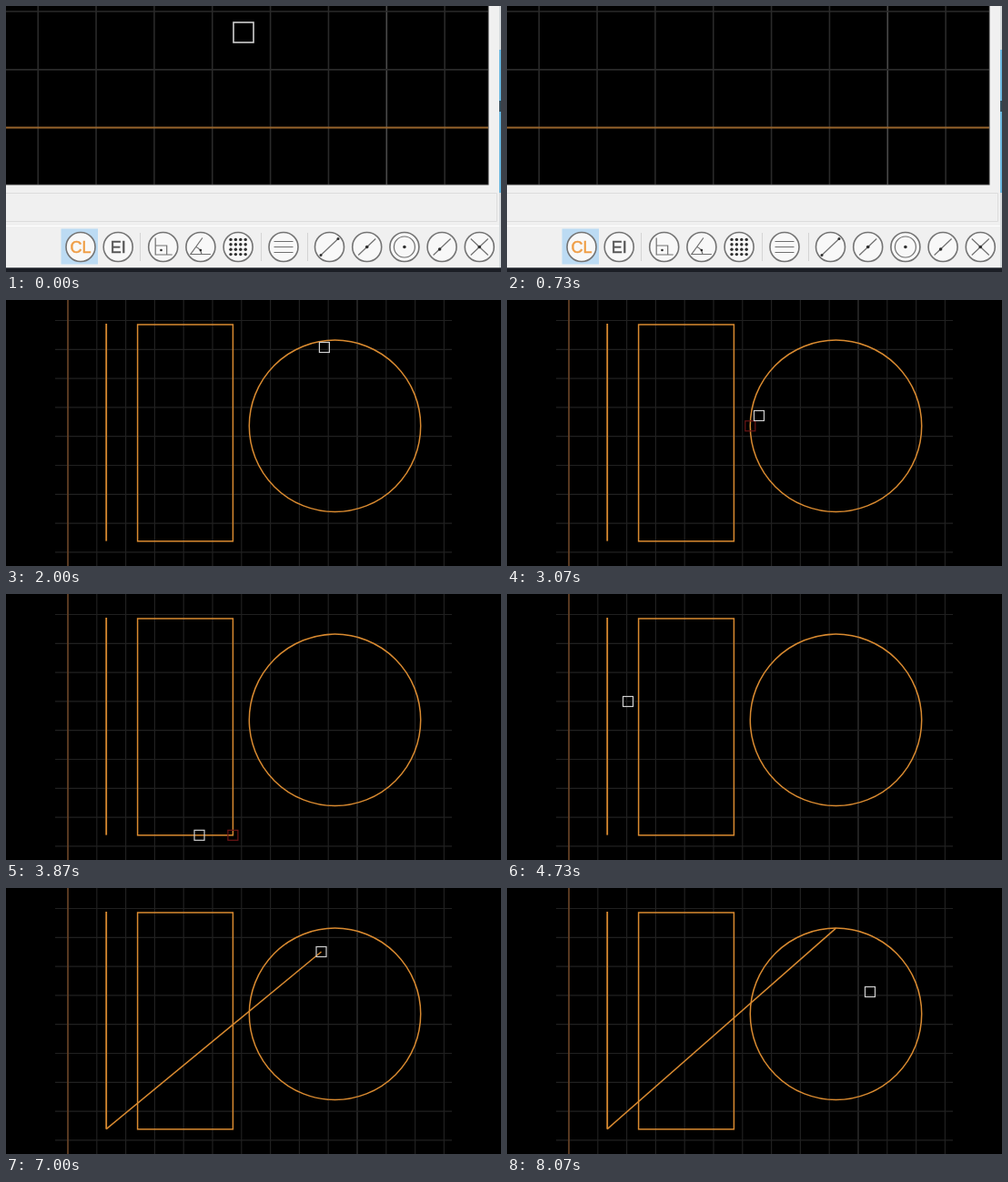
These frames come from a looping animation (544 by 292 pixels, 8.79 s). An HTML page:

```html
<!DOCTYPE html>
<html lang="en">
<head>
<meta charset="utf-8">
<title>Drawing with snap points</title>
<style>
  html, body { margin: 0; width: 100%; height: 100%; overflow: hidden; background: #000; }
  svg { display: block; width: 100%; height: 100%; }
  text { font: 18px "Liberation Sans", Arial, sans-serif; text-anchor: middle; }
  line, path, circle, .box { fill: none; }
  .grid { stroke: #2a2a2a; stroke-width: 1.6; }
  .grid .major { stroke: #4a4a4a; }
  #sheet .grid { stroke: #202020; stroke-width: 1.2; }
  #sheet .grid .major { stroke: #383838; }
  .shape { stroke: #d98a30; stroke-width: 1.5; }
  #icons { filter: blur(.35px); }
  .icon { stroke: #707070; stroke-width: 1.2; }
  .icon .ring { fill: #f8f8f8; stroke: #747474; stroke-width: 1.6; }
  .icon .dot { fill: #303030; stroke: none; }
  .icon text { stroke: #555; stroke-width: .5; fill: #555; }
  .icon .on { stroke: #ef9d45; fill: #ef9d45; }
  .pressed { fill: #bcdbf3; }
  .armed .ink { stroke: #e9a75f; stroke-width: 1.6; }
  .armed .dot { fill: #e9a75f; }
  .cursor { stroke: #d0d0d0; stroke-width: 1.2; }
  #bigCursor { stroke-width: 1.6; }
  #marker { stroke: #6c1616; stroke-width: 1.2; }
</style>
</head>
<body>
<svg viewBox="0 0 544 292" preserveAspectRatio="none">
  <defs><clipPath id="view"><rect width="530" height="196"/></clipPath></defs>

  <g id="app">
    <rect width="544" height="292" fill="#f0f0f0"/>
    <rect width="530" height="196" fill="#000"/>
    <g class="grid" id="appGrid"></g>
    <path d="M0 133.5H530" stroke="#98652c" stroke-width="2.2"/>
    <path d="M0 196.3H530.3V0" stroke="#777"/>
    <path d="M0 205.5H539.5V236.5H0" stroke="#dcdcdc"/>
    <path d="M0 241.5H544" stroke="#fff"/>
    <path d="M543 0V288" stroke="#d5d9dc" stroke-width="2"/>
    <path d="M543 48V205" stroke="#69b7df" stroke-width="2"/>
    <path d="M543 104V116" stroke="#35505f" stroke-width="2"/>
    <rect y="287.3" width="544" height="4.7" fill="#1b1e25"/>
    <path d="M147.5 249V280M280.5 249V280M331.5 249V280" stroke="#d4d4d4"/>
    <rect class="pressed" x="60.5" y="244.5" width="40.5" height="39"/>
    <rect class="pressed" id="armedBack" x="334.5" y="244.5" width="40.5" height="39"/>
    <g id="icons"></g>
    <g clip-path="url(#view)"><rect class="box cursor" id="bigCursor" width="22" height="22"/></g>
  </g>

  <g id="sheet">
    <rect width="544" height="292" fill="#000"/>
    <g class="grid" id="sheetGrid"></g>
    <path d="M68 0V292" stroke="#6a4325" stroke-width="1.6"/>
    <g class="shape">
      <line id="edge" stroke-width="1.8"/>
      <rect class="box" id="block"/>
      <circle id="wheel"/>
      <line id="band"/>
    </g>
    <rect class="box" id="marker" width="11" height="11"/>
    <rect class="box cursor" id="smallCursor" width="11" height="11"/>
  </g>
</svg>
<script>
const LOOP = 8790, STEP = 200 / 3;
const ARM = 12, CUT = 26, START = 91, COMMIT = 113;
const SNAP_RADIUS = 18, SNAP_LAG = 2;
const $ = id => document.getElementById(id);
const set = (el, attrs) => Object.entries(attrs).forEach(([k, v]) => el.setAttribute(k, v));

const edge = { x: 110.2, top: 26, bottom: 264.6 };
const block = { left: 144.6, top: 27, right: 249.4, bottom: 264.8 };
const wheel = { x: 361.5, y: 138.3, r: 94.2 };

const edgeTop = [edge.x, edge.top], edgeBottom = [edge.x, edge.bottom];
const [topLeft, bottomLeft, topRight, bottomRight] =
  [block.left, block.right].flatMap(x => [[x, block.top], [x, block.bottom]]);
const [right, bottom, left, top_] = [0, 1, 2, 3].map(q => [
  wheel.x + wheel.r * Math.cos(q * Math.PI / 2),
  wheel.y + wheel.r * Math.sin(q * Math.PI / 2)
]);
const snapPoints = [
  edgeTop, edgeBottom, topLeft, bottomLeft, topRight, bottomRight, right, bottom, left, top_
];

// The cursor visits each tour's stops in equal legs, reaching the last one at the given step.
const path = [{ step: 0, at: [261, 29] }];
function tour(until, ...stops) {
  const { step } = path[path.length - 1];
  stops.forEach((at, i) =>
    path.push({ step: step + (until - step) * (i + 1) / stops.length, at }));
}
const lineButton = [355, 264], nearBottom = [114, 230], offBlock = [153, 215];
tour(14, lineButton);
tour(23, [248, 192]);
tour(CUT, [250, 120]);
tour(46, top_, right, left, [277, 127]);
tour(71, topRight, bottomRight, bottomLeft, topLeft, [133, 118]);
tour(START, edgeTop, nearBottom, nearBottom, edgeBottom);
tour(94, bottomLeft);
tour(96, offBlock, offBlock);
tour(105, [346.5, 70]);
tour(121, top_, [399, 114]);

function cursorAt(step) {
  const i = path.findIndex(key => key.step >= step);
  if (i < 0) return path[path.length - 1].at;
  if (i === 0) return path[0].at;
  const from = path[i - 1], to = path[i];
  const u = (step - from.step) / (to.step - from.step), ease = u * u * (3 - 2 * u);
  return from.at.map((v, axis) => v + (to.at[axis] - v) * ease);
}

function drawGrid(id, x0, y0, gap, cols, rows, major, span, height) {
  let out = "";
  for (let i = 0; i < cols; i++)
    out += `<path ${i === major ? 'class="major"' : ""} d="M${x0 + i * gap} 0V${height}"/>`;
  for (let i = 0; i < rows; i++) out += `<path d="M${span[0]} ${y0 + i * gap}H${span[1]}"/>`;
  $(id).innerHTML = out;
}

const dot = (x = 0, y = 0, r = 1.8) => `<circle class="dot" cx="${x}" cy="${y}" r="${r}"/>`;
const ink = d => `<path class="ink" d="${d}"/>`;

function drawIcons() {
  const slash = ink("M-9.5 9L9.5 -9");
  let dots = "";
  for (let i = 0; i < 16; i++) dots += dot((i % 4 - 1.5) * 5.4, ((i >> 2) - 1.5) * 5.4, 1.7);
  const group = (x, ...art) => art.map((drawing, i) =>
    `<g class="icon" transform="translate(${x + i * 41.2} 264.5)">
      <circle class="ring" r="16"/>${drawing}</g>`).join("");

  $("icons").innerHTML =
    group(82, '<text class="on" y="6.5">CL</text>', '<text y="6.5">EI</text>') +
    group(172.7,
      ink("M-8.5 -10V8.5H10M-8.5 -1.5H4V8.5") + dot(-2.2, 3.5, 1.3),
      ink("M2 -10L-11 8H11M-5 0A10 10 0 0 1 1 8") + dot(0, 3.5, 1.3),
      dots) +
    group(305, ink("M-10.5 -6H10.5M-10.5 0H10.5M-10.5 6H10.5")) +
    group(355.5,
      slash + dot(-9.5, 9, 1.5) + dot(9.5, -9, 1.5),
      slash + dot(),
      '<circle class="ink" r="11.5"/>' + dot(),
      slash + dot(-2.5, 2.5),
      slash + ink("M-9.5 -9L9.5 9") + dot());
}

function drawShapes() {
  set($("edge"), { x1: edge.x, y1: edge.top, x2: edge.x, y2: edge.bottom });
  set($("block"), {
    x: block.left, y: block.top,
    width: block.right - block.left, height: block.bottom - block.top
  });
  set($("wheel"), { cx: wheel.x, cy: wheel.y, r: wheel.r });
  set($("band"), { x1: edge.x, y1: edge.bottom });
}

function place(el, [x, y]) {
  const half = el.getAttribute("width") / 2;
  set(el, { x: x - half, y: y - half });
}

const show = (el, on) => { el.style.display = on ? "" : "none"; };

function drawApp(step) {
  const armed = step >= ARM;
  show($("armedBack"), armed);
  lineIcon.classList.toggle("armed", armed);
  place($("bigCursor"), cursorAt(step));
}

function drawSheet(step) {
  const cursor = cursorAt(step);
  const [px, py] = cursorAt(step - SNAP_LAG);
  const snap = snapPoints.find(([x, y]) => Math.hypot(x - px, y - py) < SNAP_RADIUS);
  place($("smallCursor"), cursor);
  show($("marker"), snap);
  if (snap) place($("marker"), snap);

  const [x2, y2] = step >= COMMIT ? top_ : snap || cursor;
  show($("band"), step >= START);
  set($("band"), { x2, y2 });
}

function frame() {
  const step = Math.floor((performance.now() % LOOP + 5) / STEP);
  const onSheet = step >= CUT;
  show($("app"), !onSheet);
  show($("sheet"), onSheet);
  (onSheet ? drawSheet : drawApp)(step);
  requestAnimationFrame(frame);
}

drawGrid("appGrid", 35.2, 6, 63.85, 8, 2, 6, [0, 530], 196);
drawGrid("sheetGrid", 68, 22.5, 31.8, 14, 9, 10, [54, 490], 292);
drawIcons();
drawShapes();
const lineIcon = $("icons").children[6];
frame();
</script>
</body>
</html>
```
